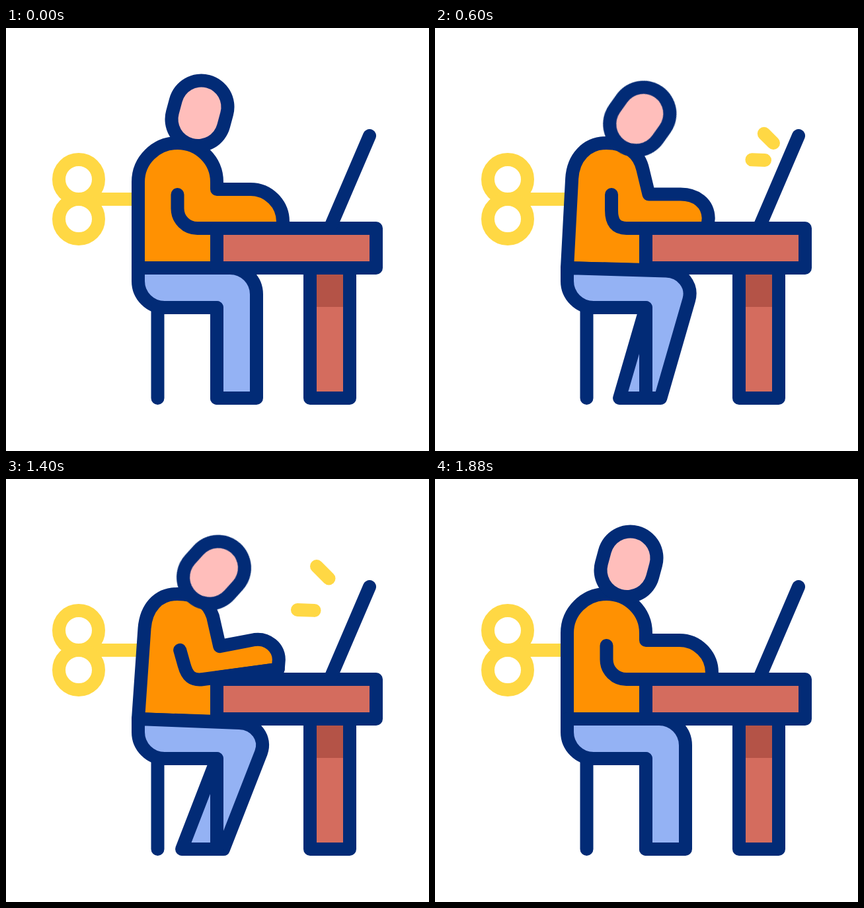
Write an HTML page without scripts that moves like this. It is 640 by 640 pixels and loops after 2000 ms.

```html
<!DOCTYPE html>
<html lang="en">
<head>
<meta charset="utf-8">
<title>Wind-up worker</title>
<style>
  html, body { margin: 0; width: 100%; height: 100%; overflow: hidden; background: #fff; }
  svg { display: block; width: 100vw; height: 100vh; }
  svg * { animation: 2s linear infinite; }

  .ink { stroke: #022b76; stroke-width: 20; }
  .gold { stroke: #ffd844; stroke-width: 20; }
  .wood { fill: #d46c5e; }
  .shade { fill: #b45347; }
  .shirt { fill: #ff9102; animation-name: torso; }
  .sleeve { animation-name: sleeve; }
  .jeans { fill: #94b2f4; animation-name: jeans; }
  .ring { animation-name: wind; }
  .head { transform-origin: 277px 180px; animation-name: nod; }
  .skull { stroke: #022b76; stroke-width: 100; }
  .face { stroke: #ffbebb; stroke-width: 60; }
  .spark { animation-name: trim, show; animation-timing-function: linear, step-end; }

  @keyframes wind {
    0%, 4.4%, 27.4%, 71%, 94%, 100% { cy: 229px; ry: 30px; }
    15.9%, 82.5% { cy: 258.8px; ry: .2px; }
  }

  @keyframes nod {
    0%, 18%, 94%, 100% { transform: rotate(0deg); }
    34%, 71% { transform: rotate(27deg); }
  }

  @keyframes jeans {
    0%, 18%, 94%, 100% { d: path("M200,363 L200,383 C200,405 218,423 240,423 L319,423 L319,560 L379,560 L379,403 C379,381 361,363 339,363 Z"); }
    34%, 71% { d: path("M200,363 L200,383 C200,405 218,423 240,423 L319,423 L266,560 L329,560 L386,414 C394,392 378,370 353,369 Z"); }
  }

  /* rest, lean, hands up, halfway back */
  @keyframes torso {
    0%, 18%, 94%, 100% { d: path("M200,363 L200,233 C200,200 227,174 259.5,174 C292,174 319,200 319,233 L319,244 L370,244 C397,244 419,266 419,293 L419,303 L319,303 L319,363 Z"); }
    34%, 54%, 62% { d: path("M200,363 L209.5,226 C212,195 230,174 259,174 C290,174 306,187 313,208 L325,254 L372,254 C394,254 411,264 412,286 L410,303 L319,303 L319,367 Z"); }
    44%, 71.5% { d: path("M200,363 L209.5,226 C212,195 230,174 259,174 C290,174 306,187 313,208 L323,253 L377,241 C396,238 413,253 413,271 L412,285 L319,300 L319,367 Z"); }
    82% { d: path("M200,363 L205,229.5 C206,197.5 228.5,174 259,174 C291,174 312.5,193.5 316,220.5 L322,249 L371,249 C395.5,249 415,265 415.5,289.5 L414.5,303 L319,303 L319,365 Z"); }
  }

  @keyframes sleeve {
    0%, 18%, 94%, 100% { d: path("M259.5,252 L259.5,273 C259.5,290 273,303 289.5,303 L419,303"); }
    34%, 54%, 62% { d: path("M269.5,252 L269.5,277 C269.5,295 274,303 290,303 L410,303"); }
    44%, 71.5% { d: path("M262,260 L269.5,282 C275,299 283,306 300,303 L412,285"); }
    82% { d: path("M264.5,252 L264.5,275 C264.5,292 273.5,303 290,303 L414.5,303"); }
  }

  @keyframes trim {
    0%, 26%, 54% { stroke-dasharray: 0 9; stroke-dashoffset: 0; }
    34%, 62% { stroke-dasharray: .667 9; stroke-dashoffset: 0; }
    38%, 66% { stroke-dasharray: .72 9; stroke-dashoffset: -.28; }
    48%, 76.4%, 100% { stroke-dasharray: 0 9; stroke-dashoffset: -1; }
  }

  @keyframes show {
    0%, 48%, 76.4%, 100% { opacity: 0; }
    26.1%, 54.1% { opacity: 1; }
  }
</style>
</head>
<body>
<svg viewBox="0 0 640 640" fill="none" stroke-linecap="round" stroke-linejoin="round">
  <g class="gold">
    <path d="M110,259 H215"/>
    <ellipse class="ring" cx="110" cy="229" rx="30" ry="30"/>
    <g transform="matrix(1 0 0 -1 0 518)">
      <ellipse class="ring" cx="110" cy="229" rx="30" ry="30"/>
    </g>
  </g>

  <g class="ink">
    <path class="shirt" d="M200,363 L200,233 C200,200 227,174 259.5,174 C292,174 319,200 319,233 L319,244 L370,244 C397,244 419,266 419,293 L419,303 L319,303 L319,363 Z"/>
    <path class="sleeve" d="M259.5,252 L259.5,273 C259.5,290 273,303 289.5,303 L419,303"/>
  </g>

  <g class="head">
    <path class="skull" d="M295.5,119.5 L290.5,138"/>
    <path class="face" d="M295.5,119.5 L290.5,138"/>
  </g>

  <g class="ink">
    <path class="jeans" d="M200,363 L200,383 C200,405 218,423 240,423 L319,423 L319,560 L379,560 L379,403 C379,381 361,363 339,363 Z"/>
    <path d="M229.5,423 V560 M229.5,423 H319 V560"/>
    <rect class="wood" x="460" y="363" width="60" height="197"/>
    <path class="shade" stroke="none" d="M470,363 H510 V422 H470 Z"/>
    <rect class="wood" x="319" y="303" width="241" height="60"/>
    <path d="M550,163 L490,303"/>
  </g>

  <g class="gold">
    <path class="spark" pathLength="1" d="M499,200 L441,198"/>
    <path class="spark" pathLength="1" d="M512,174 L470,132"/>
  </g>
</svg>
</body>
</html>
```
